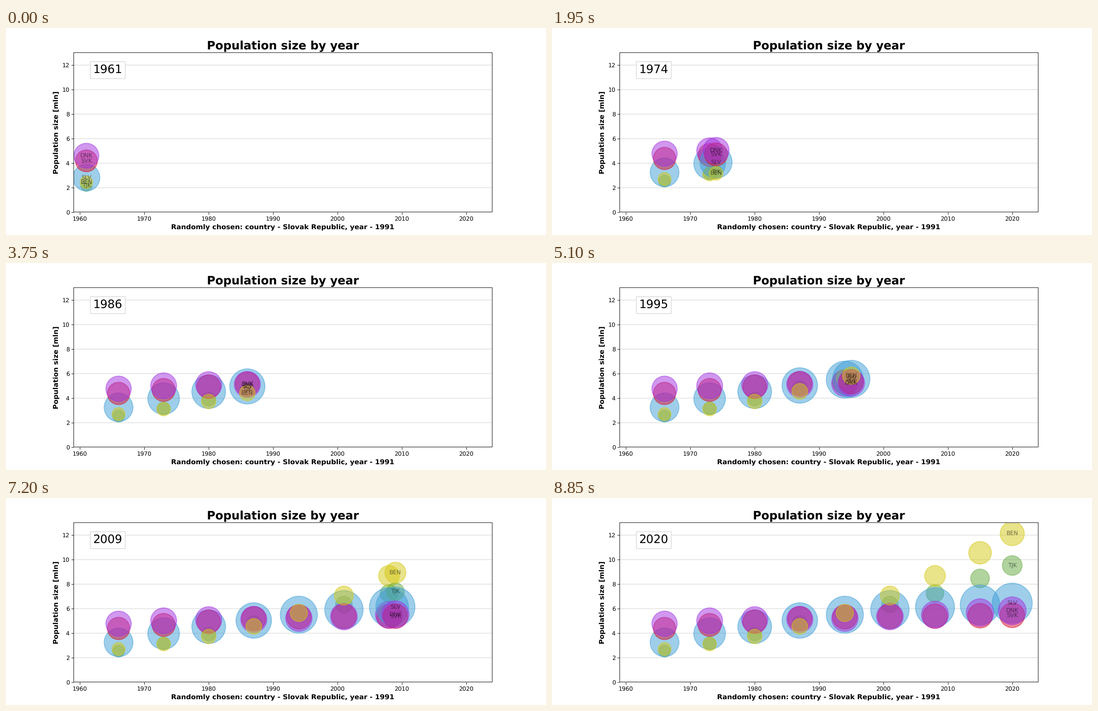
Recreate the animation shown at these times as a matplotlib script. Size 1207 by 464 pixels, loop 9000 ms.

```python
import matplotlib.pyplot as plt
import numpy as np
from matplotlib.animation import FuncAnimation
from matplotlib.patches import Rectangle

WIDTH, HEIGHT = 1207, 464
DPI = WIDTH / 13
FIRST_YEAR, LAST_YEAR = 1961, 2020
TRAIL_START, TRAIL_STEP = 1966, 7
KEY_YEARS = [FIRST_YEAR, 1975, *range(1990, 2021, 10)]

# Back to front: code, area (thousand km2), colour, population (mln) at KEY_YEARS.
COUNTRIES = [
    ("TJK", 138.8, (101, 171, 65), [2.17, 3.38, 5.28, 6.22, 7.53, 9.52]),
    ("SLV", 20.72, (62, 158, 215), [2.82, 4.20, 5.27, 5.89, 6.18, 6.45]),
    ("SVK", 48.09, (216, 17, 45), [4.19, 4.76, 5.30, 5.38, 5.39, 5.46]),
    ("DNK", 40.0, (163, 51, 225), [4.61, 5.08, 5.14, 5.34, 5.55, 5.83]),
    ("BEN", 112.76, (213, 201, 21), [2.45, 3.24, 4.96, 6.87, 9.20, 12.12]),
]
AREAS = np.array([c[1] for c in COUNTRIES])
COLORS = np.array([(*np.array(c[2]) / 255, 0.5) for c in COUNTRIES])


def populations(year):
    """Constant growth rate between key years."""
    return np.exp([np.interp(year, KEY_YEARS, np.log(c[3])) for c in COUNTRIES])


def bubble_sizes(pops):
    """Marker area grows with population density."""
    return 15 * pops * 1000 / AREAS + 140


plt.rcParams["text.hinting"] = "no_hinting"
# The tiny margin keeps the pixel size from being truncated.
fig, ax = plt.subplots(
    figsize=((WIDTH + 1e-3) / DPI, (HEIGHT + 1e-3) / DPI), dpi=DPI)
fig.subplots_adjust(left=0.125, right=0.9, bottom=0.11, top=0.88)
ax.set(xlim=(1959, 2024), ylim=(0, 13))
ax.set_axisbelow(True)
ax.grid(axis="y", color="#b0b0b0", alpha=0.6, linewidth=0.8, snap=False)
ax.set_title("Population size by year", fontsize=20, fontweight="bold")
ax.set_xlabel("Randomly chosen: country - Slovak Republic, year - 1991",
              fontsize=12, fontweight="bold")
ax.set_ylabel("Population size [mln]", fontsize=12, fontweight="bold")

# A soft, unsnapped frame half a pixel up and right of the axes.
ax.spines[:].set_visible(False)
box = ax.get_position()
fig.add_artist(Rectangle(
    (box.x0 + 0.5 / WIDTH, box.y0 + 0.5 / HEIGHT), box.width, box.height,
    transform=fig.transFigure, fill=False, linewidth=0.8, snap=False))

year_text = ax.text(1962, 11.35, "", fontsize=20, zorder=4,
                    bbox=dict(facecolor="white", edgecolor="lightgray", pad=5))
bubbles = ax.scatter([], [], linewidths=1.5)
labels = [ax.text(0, 0, c[0], ha="center", va="center", alpha=0.5)
          for c in COUNTRIES]


def update(frame):
    year = FIRST_YEAR + frame
    shown = [*range(TRAIL_START, year, TRAIL_STEP), year]
    pops = [populations(y) for y in shown]
    bubbles.set_offsets(np.column_stack(
        [np.repeat(shown, len(COUNTRIES)), np.concatenate(pops)]))
    bubbles.set_sizes(np.concatenate([bubble_sizes(p) for p in pops]),
                      dpi=fig.dpi)
    colors = np.tile(COLORS, (len(shown), 1))
    bubbles.set_facecolor(colors)
    bubbles.set_edgecolor(colors)
    for label, pop in zip(labels, pops[-1]):
        label.set_position((year, pop))
    year_text.set_text(str(year))
    return bubbles, year_text, *labels


anim = FuncAnimation(fig, update, frames=LAST_YEAR - FIRST_YEAR + 1,
                     init_func=lambda: update(0), interval=150,
                     repeat=True, repeat_delay=0)
plt.show()
```
